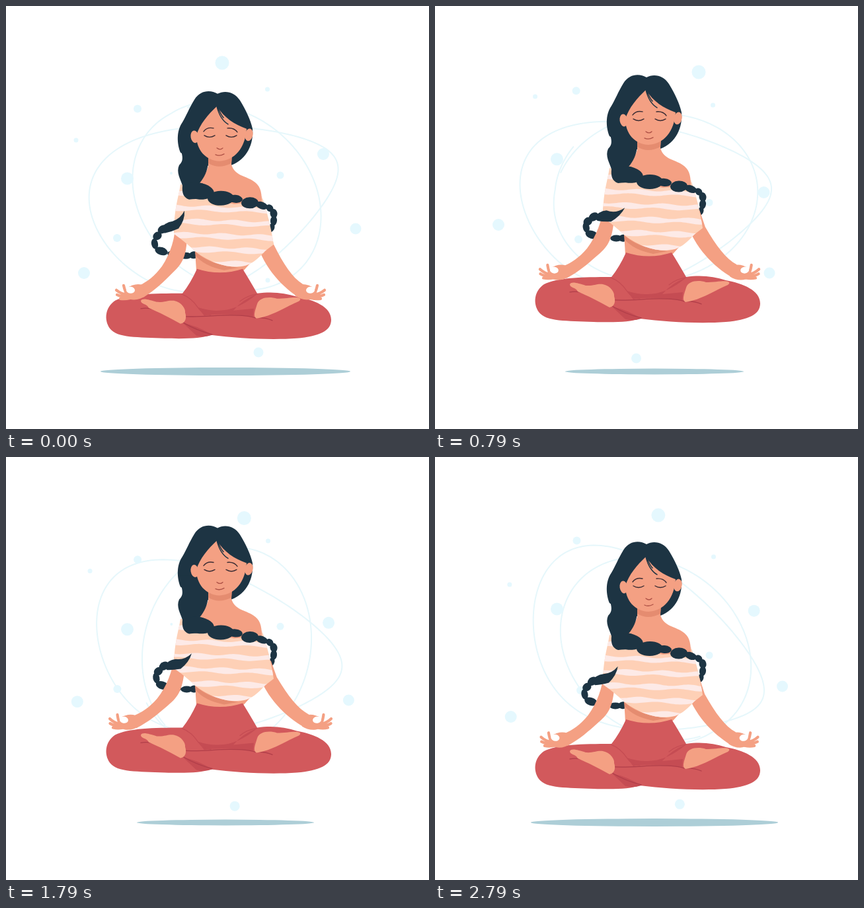
Animation of 640x640 px, one loop 2.87 s. Source, as an HTML page with a canvas:

```html
<!DOCTYPE html>
<html lang="en">
<head>
<meta charset="utf-8">
<title>Floating meditation</title>
<style>
  html, body { margin: 0; width: 100%; height: 100%; overflow: hidden; background: #fff; }
  canvas { display: block; width: 100vw; height: 100vh; object-fit: contain; }
</style>
</head>
<body>
<canvas id="stage" width="640" height="640"></canvas>
<script>
const canvas = document.getElementById('stage');
const ctx = canvas.getContext('2d');
const ratio = Math.max(1, window.devicePixelRatio || 1);
canvas.width = canvas.height = 640 * ratio;

const LOOP = 2870, FPS = 14, LAST_STEP = 39;
const HAIR = '#1d3443', SKIN = '#f4a083', SKIN_DARK = '#e58c70', PANTS = '#d2595c',
      PANTS_DARK = '#c54c53', SEAM = '#b03e49', SHIRT = '#fed0b6', STRIPE = '#fdeae7',
      SHADOW = '#adced7', DOT = '#e5f8fe', ORBIT = '#e6f7fb';
const TAU = Math.PI * 2, RAD = Math.PI / 180;

const lerp = (a, b, k) => a + (b - a) * k;
const wave = turns => (1 - Math.cos(turns * TAU)) / 2;
const ease = k => wave(Math.min(1, Math.max(0, k)) / 2);

function fill(path, color) {
  ctx.fillStyle = color;
  ctx.fill(new Path2D(path));
}
function line(path, color, width) {
  ctx.strokeStyle = color;
  ctx.lineWidth = width;
  ctx.stroke(new Path2D(path));
}
function oval(x, y, rx, ry = rx, angle = 0, color = HAIR) {
  ctx.fillStyle = color;
  ctx.beginPath();
  ctx.ellipse(x, y, rx, ry, angle, 0, TAU);
  ctx.fill();
}

// Rise, rest at the far end, return, rest at the start.
function swing(step, period, rise, leave, back) {
  const s = step % period;
  return s < leave ? ease(s / rise) : 1 - ease((s - leave) / (back - leave));
}

// x, y, radius, then the far end x, y
const quickDots = [
  [327, 86, 10.5, 399, 100], [106, 203, 3.5, 151.5, 137], [480, 224, 9, 497.5, 282],
  [529, 337, 8.5, 506, 404], [118, 404, 9, 96, 331], [382, 524, 7.5, 304.5, 533]
];
const slowDots = [
  [199, 155.5, 6, 214.5, 126.5], [183.5, 261, 9.5, 184.5, 230], [415, 256, 5.5, 415, 300],
  [168, 351, 6, 220, 353], [396, 415, 3.5, 330, 415], [250, 253, 2, 290, 253]
];

function drawDots(step) {
  const put = ([x, y, r, x2, y2], k) => oval(lerp(x, x2, k), lerp(y, y2, k), r, r, 0, DOT);
  const quick = swing(step, 21, 8.4, 13, 19.7);
  const slow = swing(step, 24.3, 13, 15, 24.3);
  quickDots.forEach(d => put(d, quick));
  slowDots.forEach(d => put(d, slow));
  put([395.5, 126, 3.5, 421.5, 151], Math.pow(slow, 0.65));
}

function orbit(cx, cy, angle, from, to, point) {
  ctx.save();
  ctx.translate(cx, cy);
  ctx.rotate(angle * RAD);
  ctx.beginPath();
  for (let a = from; a <= to; a += 2) ctx.lineTo(...point(a * RAD, a));
  ctx.strokeStyle = ORBIT;
  ctx.lineWidth = 2;
  ctx.stroke();
  ctx.restore();
}

function drawOrbits(step) {
  orbit(323, 294, 1.04 * step - 17.8, 0, 360, t => {
    const y = 120 * (1 - 0.365 * Math.cos(t)) * Math.sin(t);
    return [187 * Math.cos(t) + y * (1 - Math.cos(t)) / 8, y];
  });
  orbit(334, 290, 4.7 * (9 - step), -151, 227, (t, a) => {
    const r = 1 + 0.045 * Math.max(0, (a - 197) / 30);
    return [155 * r * Math.cos(t), 126 * r * Math.sin(t)];
  });
}

function drawLegs() {
  fill('M286 368L288 402Q324 412 360 400L378 380Z', SKIN);
  fill('M286 371Q306 392 352 396L330 400Q300 394 287 378Z', SKIN_DARK);
  fill(`M289 398Q324 409 358 398Q368 414 380 435C402 432 422 434 440 440
    C466 445 492 455 492 475C492 492 474 500 440 503C400 506 350 503 310 498
    C295 503 275 504 240 503C200 501 168 503 157 488C148 475 150 456 165 446
    C185 436 222 435 267 435Q279 420 289 398Z`, PANTS);
  fill('M290 456Q308 462 322 461Q350 461 380 436Q358 444 344 461L375 458L374 470Q322 464 300 469Z', PANTS_DARK);
  fill('M268 480Q290 484 312 498Q300 502 288 499Z', PANTS_DARK);
  line('M266 436Q281 442 290 456Q298 467 310 468M380 436Q365 438 354 447', PANTS_DARK, 1.3);
  line('M272 470C300 471 315 468 340 468Q366 468 377 472Q392 471 403 476M268 479Q288 491 312 497M204 458Q214 456 224 459', SEAM, 1.3);
  fill(`M204 446C207 441 217 445 228 448C240 449 244 445 254 446C266 448 272 459 271 464
    C274 473 271 480 264 481C250 473 230 463 216 457C213 450 204 452 204 446Z`, SKIN);
  fill(`M445 443C442 439 425 443 410 443C398 439 383 441 380 451
    C377 461 373 470 379 473C402 470 426 454 443 447Q446 445 445 443Z`, SKIN);
}

function drawHand() {
  fill('M206 422C198 420 190 422 184 427L181 440C188 447 202 446 212 438Z', SKIN);
  line('M184 437Q174 436 167 430M184 440Q174 440 168 437M188 442Q180 444 173 443M181 433Q179 428 178 423', SKIN, 4.2);
  oval(188.5, 430, 6.5, 5, 0.1, '#fff');
}

function drawArms(angle) {
  const swingAbout = (x, a, draw) => {
    ctx.save();
    ctx.translate(x, 300);
    ctx.rotate(a);
    ctx.translate(-x, -300);
    draw();
    ctx.restore();
  };
  swingAbout(268, angle, () => {
    fill(`M257 325C256 352 249 374 236 394C225 409 214 417 202 423L208 441
      C226 430 238 418 253 403C269 388 274 376 274 340Z`, SKIN);
    drawHand();
  });
  swingAbout(381, -angle, () => {
    fill(`M376 350C388 392 413 421 441 440L449 421C433 411 420 391 405 361L398 335Z`, SKIN);
    ctx.translate(649, 0);
    ctx.scale(-1, 1);
    drawHand();
  });
}

function drawShirt() {
  const outline = new Path2D(`M264 270C261 290 254 308 254 345C266 353 276 362 288 373
    C306 386 328 395 350 395C370 395 384 380 392 371L405 361C401 336 395 310 387 288L330 292Z`);
  ctx.save();
  ctx.clip(outline);
  ctx.fillStyle = SHIRT;
  ctx.fillRect(240, 260, 180, 150);
  ctx.fillStyle = STRIPE;
  for (let i = 0; i < 6; i++) {
    const y = 281 + 20.6 * i;
    ctx.beginPath();
    for (let x = 245; x <= 415; x += 3)
      ctx.lineTo(x, y + (x - 250) * 0.03 + 1.4 * Math.sin(x / 9 + i * 2));
    for (let x = 415; x >= 245; x -= 3)
      ctx.lineTo(x, y + 7 + (x - 250) * 0.03 + 1.5 * Math.sin(x / 11 + i * 3));
    ctx.fill();
  }
  ctx.restore();
}

function drawHead() {
  fill(`M320 133C310 127 294 127 285 142C277 155 273 166 267 176C257 190 259 210 264 222L300 242
    L341 241C365 232 375 208 373 186C370 172 363 158 354 143C346 130 331 127 320 133Z`, HAIR);
  fill(`M306 224L306 242C302 258 292 266 280 272L300 290L345 300L387 296C387 280 384 271 374 265
    C362 257 346 257 341 240L342 222Z`, SKIN);
  fill('M306 229L306 238Q322 248 341 238L342 225Z', SKIN_DARK);
  fill(`M262 205C264 222 272 232 262 241C257 252 264 262 267 272C266 282 268 290 277 293
    C290 292 304 291 313 287C312 276 300 268 293 268C300 260 305 250 306 236L288 205Z`, HAIR);
  oval(285.5, 198, 6, 9.5, -0.15, SKIN);
  oval(367.5, 195, 6, 9.5, 0.2, SKIN);
  fill(`M319 152C306 164 293 179 288 196C288 218 302 234 323 235C346 234 362 215 364 186
    C345 179 331 170 319 152Z`, SKIN);
  line('M319 152Q324 172 336 179M320 152Q325 165 329 169', HAIR, 1.5);
  line('M299 190Q304 183 314 185M335 185Q345 184 350 191M300 196Q308 201 316 196M333 196Q341 201 349 196', '#3b2c33', 1.4);
  line('M319 215Q324 219 328 215M317 225Q323 228 330 224', '#ad5045', 1.3);
}

function drawChestBraid() {
  oval(291, 280, 24, 12.5, 0.15);
  oval(325, 291, 20, 11, -0.02);
  oval(347, 292, 11, 6, 0.1);
  oval(369, 298, 13, 8.5, -0.05);
  oval(387, 302, 9.5, 5.5, 0.35);
  oval(399, 306, 6, 5, 0.8);
  oval(405, 314, 5.5, 7, -0.2);
}

// x, y, rx, ry, tilt, then x, y at the far pose
const tailBeads = [
  [237, 338, 8, 6, -0.6, 241, 346], [229, 348, 7, 6, -0.6, 232, 352],
  [225, 360, 5, 8, -0.2, 230, 360], [235, 371, 10, 6, 0.3, 238, 371],
  [254, 376, 10, 5, 0.2, 257, 373], [272, 378, 9, 5, 0, 275, 376], [284, 377, 7, 5.5, -0.1, 285, 376]
];
// tail tip outline: near pose x, y, far pose x, y
const tipOutline = [
  [234, 339, 243, 348], [240, 327, 250, 338], [252, 326, 262, 337], [264, 322, 276, 346], [270, 310, 293, 337],
  [271, 324, 284, 349], [261, 337, 268, 356], [250, 342, 255, 355], [240, 344, 248, 352]
];

function drawTailBeads(k) {
  for (const [x, y, rx, ry, tilt, x2, y2] of tailBeads)
    oval(lerp(x, x2, k), lerp(y, y2, k), rx, ry, tilt);
  oval(405, 325, 5, 7.5, 0.1);
  oval(401, 336, 5, 7, 0.5);
}

function drawTailTip(k) {
  const p = tipOutline.map(([x, y, x2, y2]) => [lerp(x, x2, k), lerp(y, y2, k)]);
  ctx.beginPath();
  ctx.moveTo(...p[0]);
  ctx.quadraticCurveTo(...p[1], ...p[2]);
  ctx.quadraticCurveTo(...p[3], ...p[4]);
  ctx.quadraticCurveTo(...p[5], ...p[6]);
  ctx.quadraticCurveTo(...p[7], ...p[8]);
  ctx.fillStyle = HAIR;
  ctx.fill();
}

function draw(step) {
  const lift = wave((7.5 + 9.536 * step) / 360);
  const tail = wave(step / 33);

  ctx.setTransform(ratio, 0, 0, ratio, 0, 0);
  ctx.fillStyle = '#fff';
  ctx.fillRect(0, 0, 640, 640);
  ctx.lineCap = ctx.lineJoin = 'round';

  drawOrbits(step);
  drawDots(step);
  oval(332, 553, 189.5 - 78.5 * lift, 6 - 2.3 * lift, 0, SHADOW);

  ctx.translate(0, -36.3 * lift);
  drawTailBeads(tail);
  drawLegs();
  drawArms(0.08 * wave(step / 17));
  drawShirt();
  drawHead();
  drawChestBraid();
  drawTailTip(tail);
}

function tick() {
  const t = performance.now() % LOOP;
  draw(Math.min(LAST_STEP, Math.floor((t + 5) * FPS / 1000)));
  requestAnimationFrame(tick);
}
tick();
</script>
</body>
</html>
```
